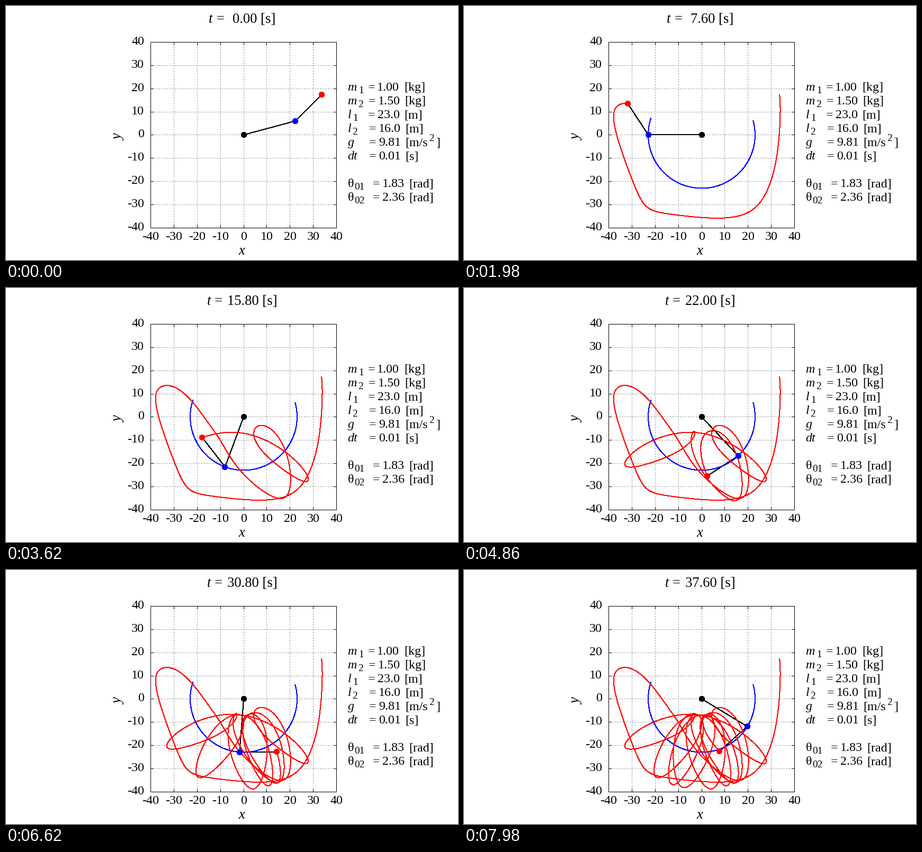
Recreate the animation shown at these times as a matplotlib script. Size 854 px wide and 480 px high, loop 8 s.

```python
import math

import matplotlib.pyplot as plt
import numpy as np
from matplotlib.animation import FuncAnimation

W, H, DPI = 854, 480, 64
PT = 72 / DPI  # points per pixel
LEFT, RIGHT, TOP, BOTTOM = 273, 624, 68, 419
CX, CY, SCALE = 449, 243.5, 351 / 80

M1, M2, L1, L2, G, DT = 1.0, 1.5, 23.0, 16.0, 9.81, 0.01
START = (7 * math.pi / 12, 3 * math.pi / 4, 0.0, 0.0)
LOOP, TICK, HOLD, STEP = 8000, 20, 500, 40  # ms
SUB = 20  # integration steps per picture

plt.rcParams["font.family"] = "Liberation Serif"


def slope(s):
    a, b, u, v = s
    d = a - b
    sin, cos = math.sin(d), math.cos(d)
    den = 2 * M1 + M2 - M2 * math.cos(2 * d)
    du = (-G * (2 * M1 + M2) * math.sin(a) - M2 * G * math.sin(a - 2 * b)
          - 2 * sin * M2 * (v * v * L2 + u * u * L1 * cos)) / (L1 * den)
    dv = 2 * sin * ((M1 + M2) * (u * u * L1 + G * math.cos(a))
                    + v * v * L2 * M2 * cos) / (L2 * den)
    return u, v, du, dv


def rk4(s):
    def shift(k, h):
        return [p + h * q for p, q in zip(s, k)]

    k1 = slope(s)
    k2 = slope(shift(k1, DT / 2))
    k3 = slope(shift(k2, DT / 2))
    k4 = slope(shift(k3, DT))
    return [p + DT / 6 * (a + 2 * b + 2 * c + d)
            for p, a, b, c, d in zip(s, k1, k2, k3, k4)]


def simulate(n):
    states = [START]
    for _ in range(n):
        states.append(rk4(states[-1]))
    a, b = np.array(states)[:, :2].T
    x1, y1 = L1 * np.sin(a), -L1 * np.cos(a)
    x2, y2 = x1 + L2 * np.sin(b), y1 - L2 * np.cos(b)
    return (CX + SCALE * x1, CY - SCALE * y1,
            CX + SCALE * x2, CY - SCALE * y2)


def picture(ms):
    return 0 if ms < HOLD else (ms - HOLD) // STEP + 1


X1, Y1, X2, Y2 = simulate(picture(LOOP - TICK) * SUB)

fig = plt.figure(figsize=(W / DPI, H / DPI), dpi=DPI, facecolor="white")
ax = fig.add_axes([0, 0, 1, 1])
ax.set_xlim(0, W)
ax.set_ylim(H, 0)
ax.axis("off")


# Without antialiasing every touched pixel is filled, so an unsnapped
# one-pixel stroke comes out two pixels wide.
def line(xs, ys, color="black", z=2, snap=True, **kw):
    return ax.plot(xs, ys, color=color, lw=PT, zorder=z, snap=snap,
                   antialiased=False, **kw)[0]


def text(x, y, s, size=24, italic=False, **kw):
    return ax.text(x, y, s, fontsize=size * PT,
                   style="italic" if italic else "normal", **kw)


def pixel(x, y):
    return math.floor(x) + 0.5, math.floor(y) + 0.5


def dot(color):
    return ax.add_patch(plt.Circle(pixel(CX, CY), 5, fc=color, ec="none",
                                   antialiased=False, zorder=6))


def draw_axes():
    for i in range(9):
        label = str(10 * i - 40)
        x = int(LEFT + 43.875 * i + 0.5)
        y = int(BOTTOM - 43.875 * i + 0.49)
        if 0 < i < 8:
            dash = dict(color="#a0a0a0", z=1, linestyle=(0, (2, 2)),
                        dash_capstyle="butt")
            line([x, x], [BOTTOM, TOP], **dash)
            line([LEFT, RIGHT], [y, y], **dash)
            for edge, inner in ((TOP, TOP + 5), (BOTTOM, BOTTOM - 5)):
                line([x, x], [edge, inner])
            for edge, inner in ((LEFT, LEFT + 5), (RIGHT, RIGHT - 5)):
                line([edge, inner], [y, y])
        text(x + 0.5, 442, label, ha="center")
        text(261, y + 5, label, ha="right")
    line([LEFT, RIGHT, RIGHT, LEFT, LEFT], [TOP, TOP, BOTTOM, BOTTOM, TOP])
    text(445.5, 470, "x", 26.67, True, ha="center")
    text(213, 248, "y", 26.67, True, ha="center", va="center", rotation=90)


def draw_legend():
    # row, symbol, subscript, subscript x, equals x, number, unit
    rows = (
        (0, "m", "1", 666, 683.3, "1.00", "[kg]"),
        (1, "m", "2", 665.5, 685, "1.50", "[kg]"),
        (2, "l", "1", 655, 683.6, "23.0", "[m]"),
        (3, "l", "2", 654, 685.5, "16.0", "[m]"),
        (4, "g", "", 0, 686, "9.81", "[m/s"),
        (5, "dt", "", 0, 686, "0.01", "[s]"),
        (7, "θ", "01", 658.5, 693, "1.83", "[rad]"),
        (8, "θ", "02", 658.5, 693, "2.36", "[rad]"),
    )
    for row, sym, sub, sx, vx, number, unit in rows:
        y = 160 + 26 * row
        text(645.5, y, sym, italic=sym != "θ")
        if sub:
            text(sx, y + 5, sub, 19.2)
        text(vx, y, "=")
        text(vx + 18, y, number)
        text(vx + 68.5, y, unit)
    text(799.5, 255, "2", 19.2)
    text(812.5, 264, "]")


draw_axes()
draw_legend()
rods = line([], [], z=3, snap=False)
trail1 = line([], [], "blue", 4, False)
trail2 = line([], [], "red", 5, False)
dot("black")
bob1, bob2 = dot("blue"), dot("red")
clock_t = text(383, 32, "t", 26.67, True)
equals = text(397, 32, "=", 26.67)
clock = text(428, 32, "", 26.67)


def update(i):
    n = picture(i * TICK) * SUB
    t = n * DT
    rods.set_data([CX, X1[n], X2[n]], [CY, Y1[n], Y2[n]])
    end = n + 1 if n else 0
    trail1.set_data(X1[:end], Y1[:end])
    trail2.set_data(X2[:end], Y2[:end])
    bob1.center = pixel(X1[n], Y1[n])
    bob2.center = pixel(X2[n], Y2[n])
    wide = t > 9.99
    x = 379.5 if wide else 383
    clock_t.set_x(x)
    equals.set_x(x + 14.5)
    clock.set_x(417.5 if wide else 428)
    clock.set_text(f"{t:.2f} [s]")
    return rods, trail1, trail2, bob1, bob2, clock_t, equals, clock


anim = FuncAnimation(fig, update, frames=LOOP // TICK, interval=TICK,
                     init_func=lambda: update(0), repeat=True,
                     repeat_delay=0, cache_frame_data=False)
plt.show()
```
